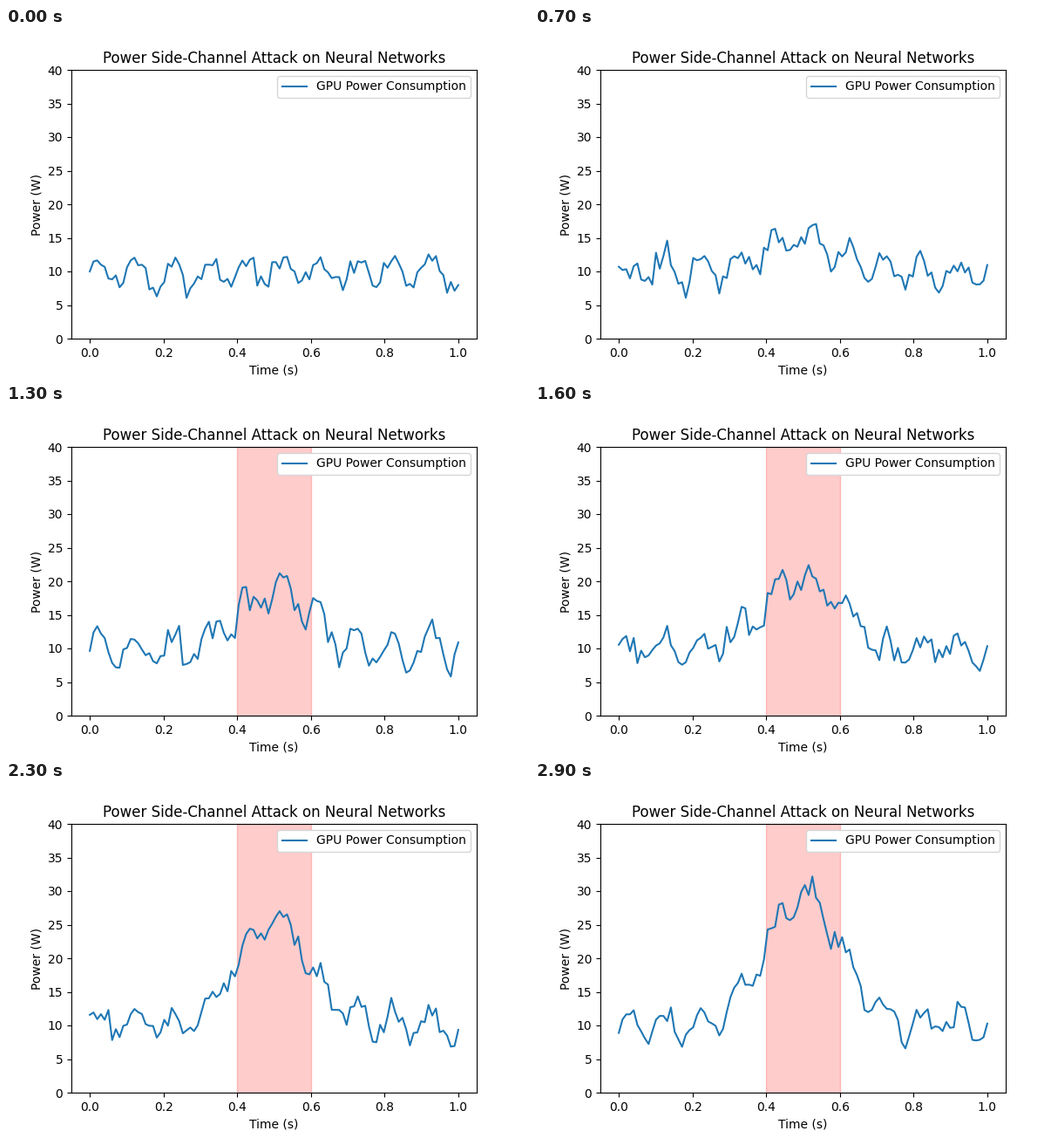
Animation of 600 by 400 pixels, one loop 3 s. Source, as a matplotlib script:

```python
import numpy as np
import matplotlib.pyplot as plt
from matplotlib.animation import FuncAnimation

FRAMES = 30
INTERVAL = 100
SPAN_START = 11  # first frame that highlights the attack window

t = np.linspace(0, 1, 100)
ripple = 10 + 2 * np.sin(2 * np.pi * 10 * t)
bump = 20 * np.exp(-((t - 0.5) ** 2) / (2 * 0.1 ** 2))


def power(frame):
    """Noisy ripple with a bump that grows linearly over the loop."""
    noise = np.random.default_rng(frame + 7).normal(0, 1, t.size)
    return ripple + bump * frame / FRAMES + noise


fig, ax = plt.subplots(figsize=(6, 4), dpi=100)
line, = ax.plot(t, power(0), color="tab:blue", lw=1.5,
                label="GPU Power Consumption")
span = ax.axvspan(0.4, 0.6, color="red", alpha=0.2, visible=False)

ax.set_xlim(-0.05, 1.05)
ax.set_ylim(0, 40)
ax.set_title("Power Side-Channel Attack on Neural Networks")
ax.set_xlabel("Time (s)")
ax.set_ylabel("Power (W)")
ax.legend(loc="upper right", framealpha=1, edgecolor="0.84")


def update(frame):
    line.set_ydata(power(frame))
    span.set_visible(frame >= SPAN_START)
    return line, span


anim = FuncAnimation(fig, update, frames=FRAMES, interval=INTERVAL,
                     repeat=True, repeat_delay=0)
plt.show()
```
